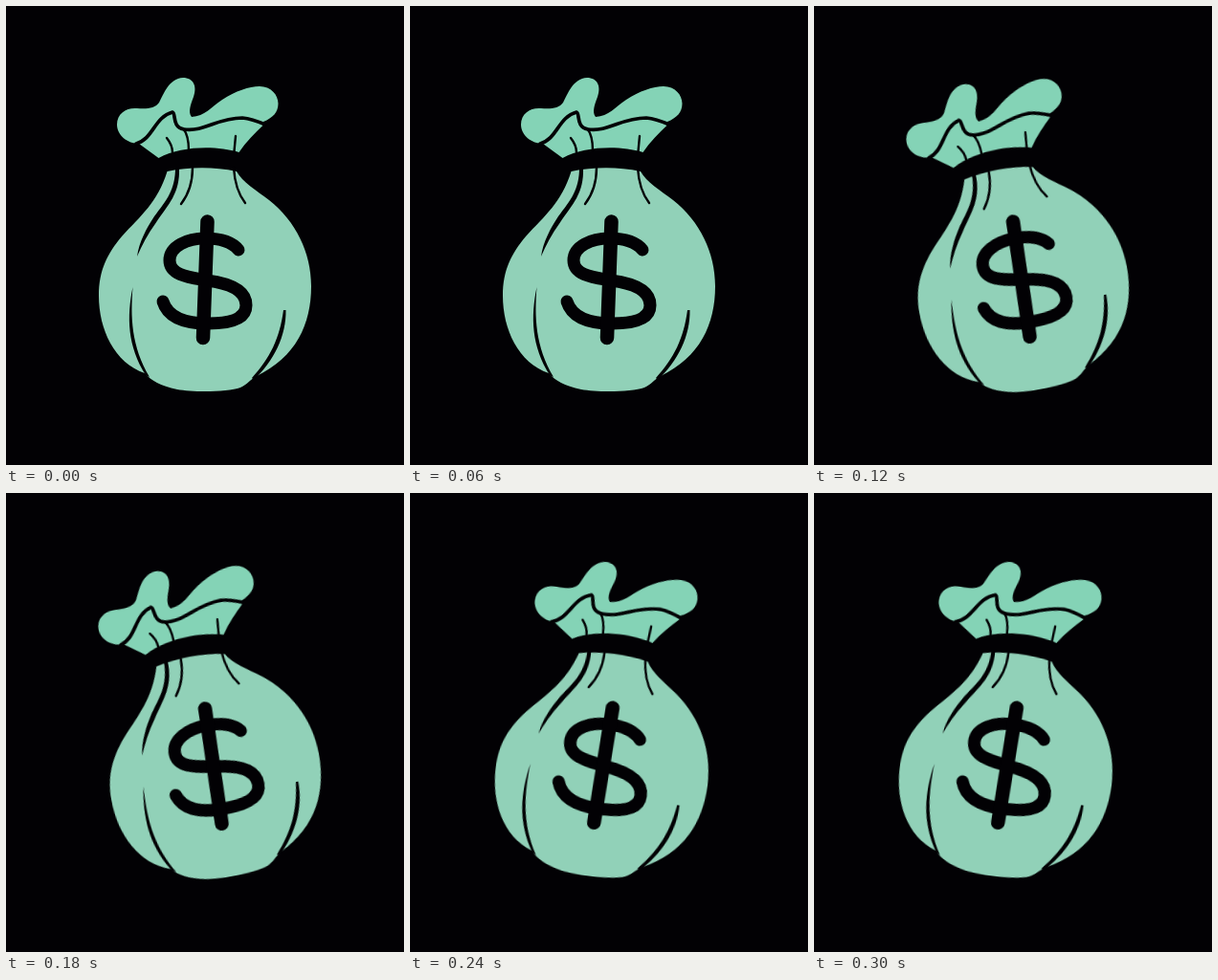
These frames come from a looping animation (416x480 px, 0.36 s). An HTML page:

```html
<!DOCTYPE html>
<html lang="en">
<head>
<meta charset="utf-8">
<title>Money bag</title>
<style>
  :root { --ink: #020104; --mint: #91d1b8; --ruffle: #84d3b6; }
  html, body { margin: 0; width: 100%; height: 100%; overflow: hidden; background: var(--ink); }
  svg { display: block; width: 100vw; height: 100vh; }
  .cloth { fill: var(--mint); }
  .ruffle { fill: var(--ruffle); }
  .taper { fill: var(--ink); }
  .line { fill: none; stroke: var(--ink); stroke-width: 2.4; stroke-linecap: round; stroke-linejoin: round; }
  .hem { stroke-width: 3.7; }
  .sign { stroke-width: 13; }
  .bar { stroke-width: 14.5; }
  /* The bag rocks between three held poses. */
  .bag { transform-origin: 208px 240px; animation: rock 360ms step-end infinite; }
  @keyframes rock {
    0% { transform: none; }
    33.3333% { transform: translate(0.2px, 0.2px) rotate(-10.4deg); }
    66.6667% { transform: translate(-0.5px, -1.2px) rotate(7.1deg); }
    100% { transform: none; }
  }
</style>
</head>
<body>
<svg viewBox="0 0 416 480" preserveAspectRatio="none">
  <g class="bag">
    <!-- ruffle and neck -->
    <path class="ruffle" d="M159.5 159 L139 144 C127 144 116 135 116 124 C116 112 126 106 137 107
      C147 108 156 107 160 101 C165 92 170 76 185 75 C196 75 200 84 196 95
      C193 103 190 111 194 116 C208 115 214 106 226 98 C240 89 254 84 265 84
      C277 84 284.5 93 284.5 102 C284.5 111 279 117 269 121 L269.5 124
      C260 133 251 142 243.5 153 C220 146 184 146 159.5 159 Z"/>
    <path class="line hem" d="M136 144 C154 139 155 116 174 111 C178 112 173 127 186 129
      C208 132 220 117 247 117 C257 118 264 121 271 124"/>
    <path class="line" d="M168 138 C172 143 174 147 174 153 M185 128 C190 134 191 142 191 151 M240 136 L238.5 152"/>

    <!-- body -->
    <path class="cloth" d="M168.5 173 C192 168 218 168 241 173 C247 184 262 193 275 203
      C303 225 319 258 319 293 C319 333 303 367 262 387 C256 390 252 396 245 399
      C232 404 195 404 179 401 C161 397 152 392 145 384 C113 373 97 338 97 303
      C97 276 106 259 121 241 C141 219 158 206 168.5 173 Z"/>
    <path class="taper" d="M177 169 L181 169 C182 196 170 207 156.5 227 C148 239 142 250 137 262
      C139 247 147 232 155 220 C168 203 177 192 177 169 Z"/>
    <path class="line" d="M195 169 C195 186 190 198 183 207 M238 169 C239 186 243 197 250 206"/>
    <path class="taper" d="M132.5 294 C130 325 131 356 150 388 L146 386 C127 356 126 325 132.5 294 Z"/>
    <path class="taper" d="M292.5 318 C293 345 280 371 259 391 L257 389 C276 368 286 348 290 318 Z"/>

    <!-- dollar sign -->
    <path class="line sign" d="M243 255 C235 245 221 243 208 243 C190 243 171 251 171 266
      C171 282 193 284 210 287 C234 290 251 298 251 313 C251 328 233 332 211 332
      C186 332 169 325 164 309"/>
    <path class="line bar" d="M210.5 225.5 L206 347"/>
  </g>
</svg>
</body>
</html>
```
